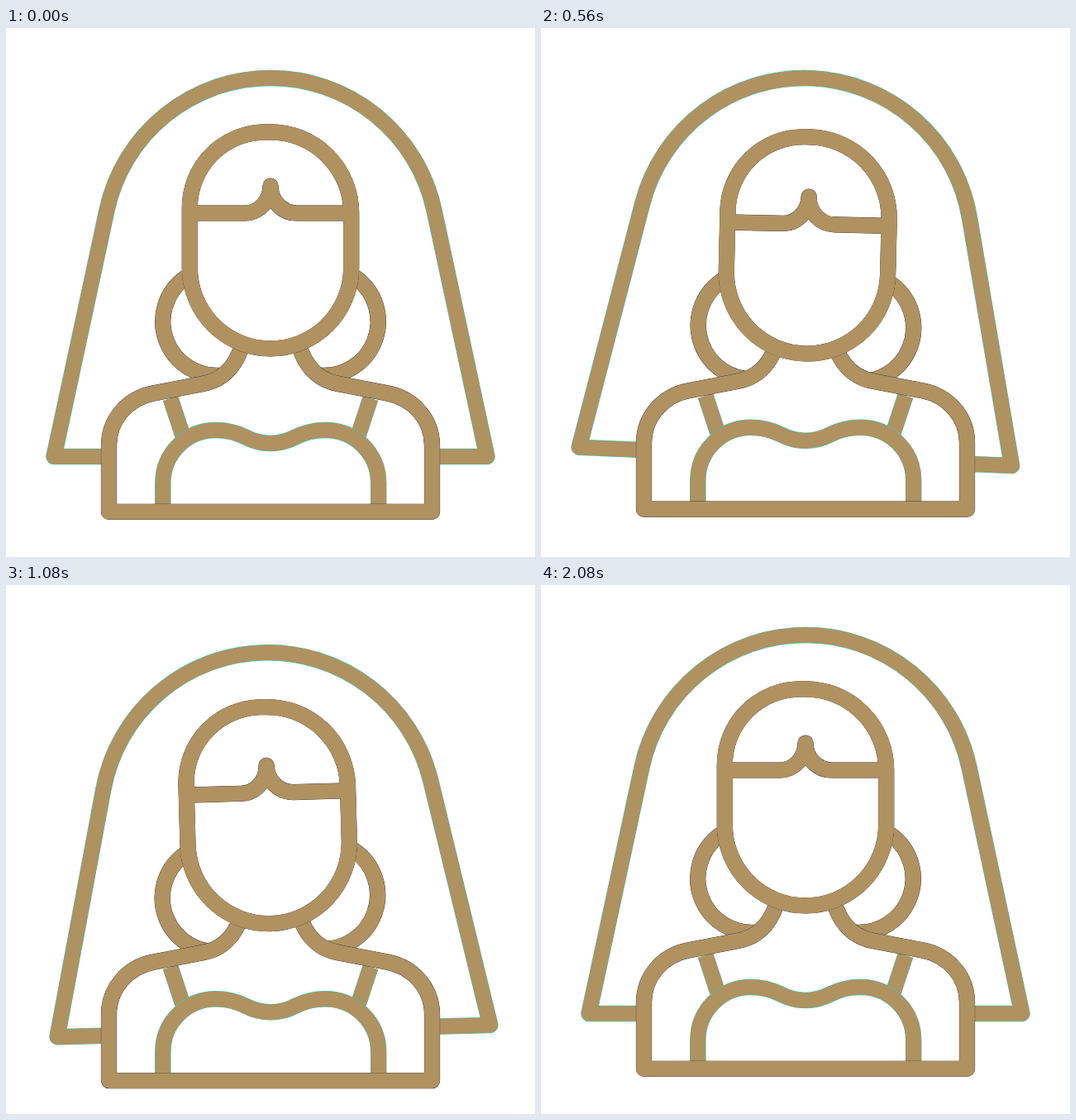
These frames come from a looping animation (640x640 px, 2.2 s). An HTML page:

```html
<!DOCTYPE html>
<html lang="en">
<head>
<meta charset="utf-8">
<title>Bride icon</title>
<style>
  html, body { margin: 0; width: 100%; height: 100%; overflow: hidden; background: #fff; }
  svg { display: block; width: 100vw; height: 100vh;
        fill: none; stroke: #af9260; stroke-width: 18.7; stroke-linejoin: round; }
  .solid { fill: #fff; stroke: none; }
  .cap { stroke-linecap: round; }
  .dark .rim { stroke: #121331; stroke-width: 19.2; }
  .teal .rim { stroke: #1fd6cf; stroke-width: 19.5; }
</style>
</head>
<body>
<svg viewBox="0 0 640 640">
  <defs>
    <path id="bun" d="M217 302A65.3 65.3 0 0 0 262 420"/>
    <path id="strap" d="M199 448L213.5 492"/>
    <path id="torso" d="M289 368C283 406 264 426 238 430.5L178 442C147 448 124.5 474 124.5 505V585.3H515.5V505C515.5 474 493 448 462 442L402 430.5C376 426 357 406 351 368"/>
    <path id="face" d="M222.3 290V217.5A92 91.7 0 0 1 314 125.800H320A98 98 0 0 1 417.700 224V290A97.700 98 0 0 1 222.300 290Z"/>
  </defs>
  <g id="veil" class="teal">
    <path class="line" d="M58 518.5L122 220.5A202.5 202.5 0 0 1 518 220.5L582 518.5Z"/>
  </g>
  <g id="buns" class="dark cap">
    <use class="line" href="#bun"/>
    <use class="line" href="#bun" transform="matrix(-1 0 0 1 640 0)"/>
  </g>
  <g id="body">
    <use class="solid" href="#torso"/>
    <g class="teal">
      <use class="line" href="#strap"/>
      <use class="line" href="#strap" transform="matrix(-1 0 0 1 640 0)"/>
      <path class="line" d="M189.800 585V550A64 64 0 0 1 254 486.500C268 486.500 280 490 290 495C309 505 331 505 350 495C360 490 372 486.500 386 486.500A64 64 0 0 1 450.700 550V585"/>
    </g>
    <g class="dark"><use class="line" href="#torso"/></g>
  </g>
  <g id="head" class="dark">
    <use class="solid" href="#face"/>
    <use class="line" href="#face"/>
    <g id="fringe">
      <path class="line" d="M223 224H289C306 224 320 209 320 191C320 209 334 224 352 224H417"/>
    </g>
    <use href="#face"/>
  </g>
</svg>
<script>
  const LOOP = 2200, STEP = 40, REST = 2080;
  const FIRST = 355, BEAT = 405;

  const ease = p => p * p * (3 - 2 * p);

  // Swings from rest through each peak, one per beat, and back to rest.
  function swing(t, lag, ...peaks) {
    const first = FIRST + lag;
    if (t < first) return peaks[0] * ease(t / first);
    const beat = (t - first) / BEAT, i = Math.floor(beat);
    const from = peaks[i] ?? 0, to = peaks[i + 1] ?? 0;
    return from + (to - from) * ease(beat - i);
  }

  // A thin contrasting rim sits beneath every line.
  for (const line of document.querySelectorAll('.line')) {
    const rim = line.cloneNode();
    rim.classList.add('rim');
    line.before(rim);
  }

  const place = (id, transform) =>
    document.getElementById(id).setAttribute('transform', transform);

  function draw(now) {
    const t = Math.min(Math.floor((now % LOOP) / STEP) * STEP, REST);
    const bodyY = swing(t, 0, 33, -38, 21);
    const veilY = swing(t, 0, 42, -40, 29);
    const nod = swing(t, 40, 21.5, -12.4, 13.2);
    const sway = swing(t, 85, 1.9, -1.8, 1.1, -1.15);
    const tilt = `rotate(${swing(t, 45, 3.2, -2.25, -1.35)} 320 376)`;
    const headPose = `translate(0 ${bodyY + nod}) ${tilt}`;
    place('body', `translate(0 ${bodyY})`);
    place('buns', headPose);
    place('head', headPose);
    place('fringe', `translate(0 ${0.77 * nod})`);
    place('veil', `translate(0 ${veilY}) ${tilt} rotate(${sway} 320 66)`);
  }

  let start;
  function tick(now) {
    start ??= now;
    draw(now - start);
    requestAnimationFrame(tick);
  }
  draw(0);
  requestAnimationFrame(tick);
</script>
</body>
</html>
```
